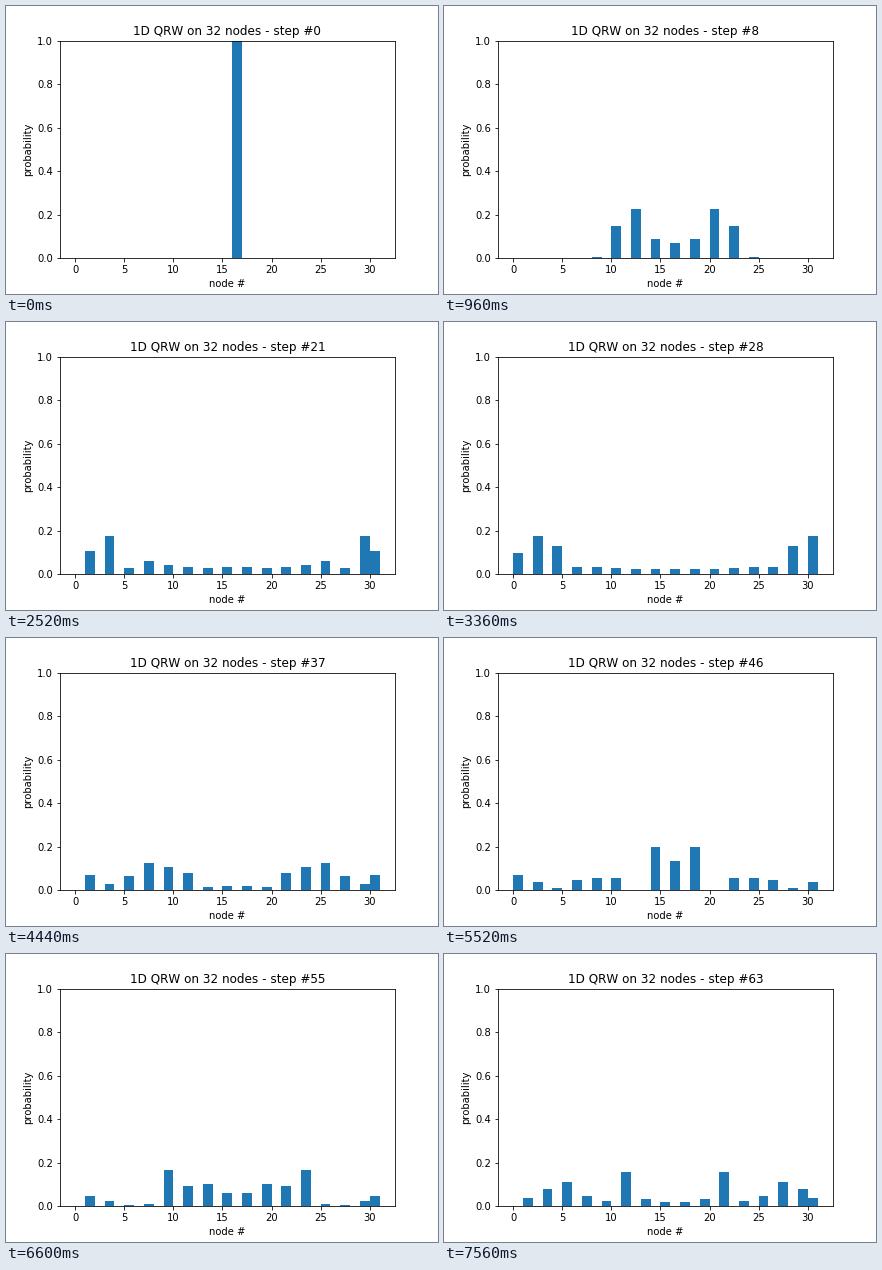
These frames come from a looping animation (432x288 px, 7.68 s). A matplotlib script:

```python
import numpy as np
import matplotlib.pyplot as plt
from matplotlib.animation import FuncAnimation

NODES, STEPS, INTERVAL = 32, 64, 120


def quantum_walk():
    """Node probabilities of a Hadamard walk on a cycle, one row per step."""
    coin = np.array([[1, 1], [1, -1]]) / np.sqrt(2)
    state = np.zeros((2, NODES), complex)
    state[:, NODES // 2] = np.array([1, 1j]) / np.sqrt(2)
    rows = []
    for _ in range(STEPS):
        rows.append((np.abs(state) ** 2).sum(axis=0))
        up, down = coin @ state
        state = np.array([np.roll(up, 1), np.roll(down, -1)])
    return np.array(rows)


def bar_heights(row):
    """The last bin holds both of the last two nodes."""
    return np.append(row[:-2], row[-2] + row[-1])


walk = quantum_walk()

plt.rcParams["font.family"] = "DejaVu Sans"
plt.rcParams["text.kerning_factor"] = 6  # whole-pixel glyph spacing
fig, ax = plt.subplots(figsize=(6, 4), dpi=72)
fig.subplots_adjust(left=0.125, right=0.9, bottom=0.125, top=0.88)
_, _, bars = ax.hist(np.arange(NODES), bins=NODES - 1, weights=walk[0])
ax.set_ylim(0, 1)
ax.set_xlabel("node #")
ax.set_ylabel("probability")
title = ax.set_title("")


def update(step):
    for bar, height in zip(bars, bar_heights(walk[step])):
        bar.set_height(height)
    title.set_text(f"1D QRW on {NODES} nodes - step #{step}")
    return [*bars, title]


anim = FuncAnimation(fig, update, frames=STEPS, interval=INTERVAL,
                     repeat=True, repeat_delay=0, blit=False)
plt.show()
```
